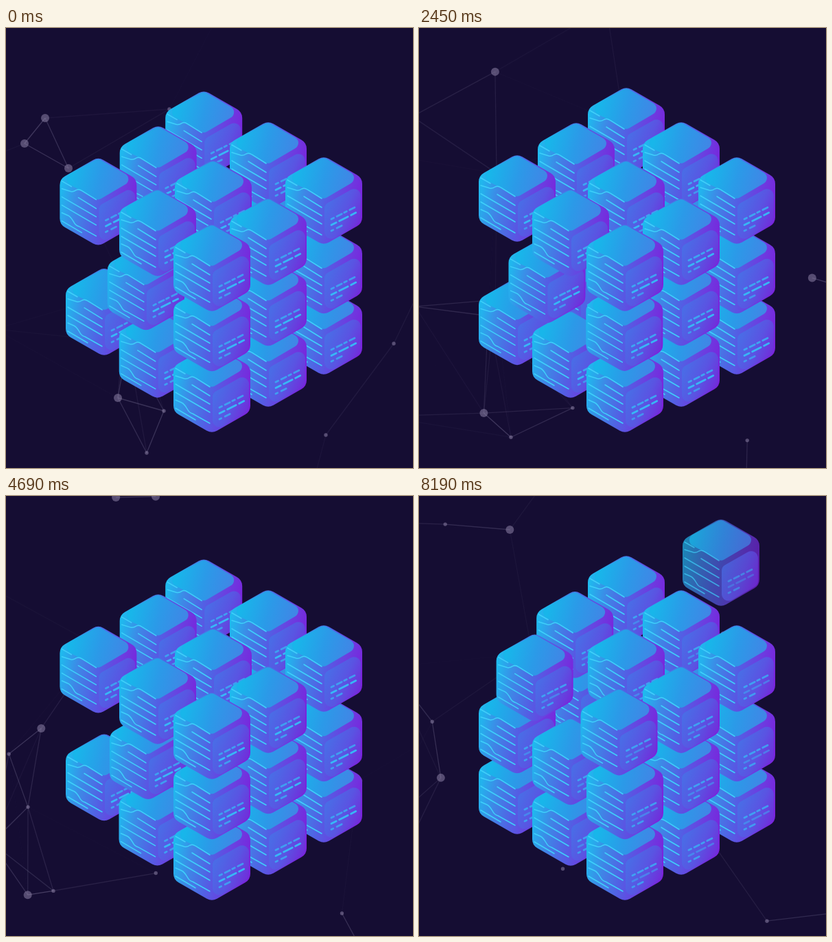
These frames come from a looping animation (593 px wide and 640 px high, 8260 ms). An HTML page with a canvas:

```html
<!DOCTYPE html>
<html lang="en">
<head>
<meta charset="utf-8">
<title>Cube conveyor</title>
<style>
  html, body { margin: 0; width: 100%; height: 100%; overflow: hidden; background: #150d33; }
  canvas { display: block; }
</style>
</head>
<body>
<canvas id="stage" width="593" height="640"></canvas>
<script>
const ctx = document.getElementById('stage').getContext('2d');
const LOOP = 8260, STEP = 70;
const clamp = v => Math.min(1, Math.max(0, v));
const mix = (a, b, p) => a + (b - a) * p;
const ease = p => p < 0.5 ? 4 * p ** 3 : 1 - 4 * (1 - p) ** 3;

// ---------- Drifting network: x, y, then drift in px per second ----------
const REACH = 215;
const hubs = [
  [57, 131, 22, -27.5], [27, 168, -15, -16], [91, 204, 9, 3], [333, -64, -24.5, 13.8],
  [163, 538, -28, 9], [638, 308, -26.6, 22.7], [177, 458, -26.8, -25.6], [-91, 631, 15, -27]
];
const dots = [
  [238, 118, 25, 10], [-142, 236, 22, -23.8], [205, 618, -29, -9.3], [230, 557, -2.5, -1.8],
  [565, 459, 27, -32], [466, 592, 5, 3.2], [419, 770, 23, -20], [-16, 438, 4.3, -13.4],
  [176, 382, -30.7, 15]
];

function drawNetwork(t) {
  const place = r => ([x, y, vx, vy]) => ({ x: x + vx * t / 1000, y: y + vy * t / 1000, r });
  const points = [...hubs.map(place(6)), ...dots.map(place(2.7))];
  ctx.lineWidth = 1.3;
  points.forEach((a, i) => points.slice(i + 1).forEach(b => {
    const near = 1 - Math.hypot(a.x - b.x, a.y - b.y) / REACH;
    if (near <= 0) return;
    ctx.strokeStyle = `rgba(150,142,178,${0.42 * near})`;
    ctx.beginPath();
    ctx.moveTo(a.x, a.y);
    ctx.lineTo(b.x, b.y);
    ctx.stroke();
  }));
  ctx.fillStyle = 'rgba(140,130,165,.55)';
  for (const { x, y, r } of points) {
    ctx.beginPath();
    ctx.arc(x, y, r, 0, 7);
    ctx.fill();
  }
}

// ---------- One cube, drawn with its top corner at the origin ----------
function roundPoly(points, radius) {
  const path = new Path2D(), n = points.length, [lx, ly] = points[n - 1];
  path.moveTo((lx + points[0][0]) / 2, (ly + points[0][1]) / 2);
  points.forEach(([x, y], i) => path.arcTo(x, y, ...points[(i + 1) % n], radius));
  path.closePath();
  return path;
}

function gradient(x0, y0, x1, y1, ...colors) {
  const g = ctx.createLinearGradient(x0, y0, x1, y1);
  colors.forEach((c, i) => g.addColorStop(i / (colors.length - 1), c));
  return g;
}

const body = roundPoly([[0, -3], [56, 29], [56, 95], [0, 127], [-56, 95], [-56, 29]], 15);
const faces = [
  [body, gradient(-56, 50, 56, 74, '#1fb9ee', '#3f86e6', '#5260e4', '#6b3fe0', '#7a22dc')],
  [roundPoly([[1, 68], [54, 38], [54, 94], [1, 125]], 10),
    gradient(2, 75, 54, 98, '#4a6ce6', '#5a54e2', '#7428da')],
  [roundPoly([[0, -1], [53, 29], [0, 60], [-56, 29]], 9),
    gradient(-38, 18, 40, 38, '#18b6ea', '#2b9ae8', '#4086e6')]
];
const circuit = new Path2D(
  'M-53 32L-39 40 M-53 43L-40 47Q-36 48 -32 45Q-28 43 -24 46L-3 59' +
  'M-29 56L-3 72 M-53 55L-3 84 M-53 67L-3 96' +
  'M-53 78L-44 82Q-40 84 -36 91Q-33 97 -28 98L-3 112 M-53 90L-24 107');
const dashRows = [[4, 5, 8, 4], [8, 5, 14, 5], [3, 6, 8, 60]];

function drawCube({ x, y, alpha }, t) {
  ctx.save();
  ctx.translate(x, y);
  ctx.globalAlpha = alpha;
  for (const [path, fill] of faces) {
    ctx.fillStyle = fill;
    ctx.fill(path);
  }
  ctx.lineCap = 'round';
  ctx.lineWidth = 1.5;
  ctx.strokeStyle = '#3fd0fa';
  ctx.stroke(circuit);
  ctx.lineWidth = 2.8;
  ctx.strokeStyle = '#36bdf8';
  dashRows.forEach((dash, i) => {
    ctx.globalAlpha = alpha * (0.7 + 0.25 * Math.sin(t / 374 + i * 1.6));
    ctx.setLineDash(dash);
    ctx.beginPath();
    ctx.moveTo(11, 89 + 8.5 * i);
    ctx.lineTo(47, 71 + 8.5 * i);
    ctx.stroke();
  });
  ctx.restore();
}

// ---------- Conveyor: cubes snake through three layers, two passes per cycle ----------
const CYCLE = 4700, MOVE = 413, OFFSET = 3510, STOREY = 88.5;

// Top ring from the back corner round to the right; the third value is extra drop in lower layers.
const ring = [
  [302, 88, 0], [229, 139, 0], [143, 186, 4], [221, 236, 0], [300, 287, -1], [382, 249, 0], [463, 189, 13]
];
const below = storeys => ring.slice(2).map(([x, y, drop]) => [x, y + drop + STOREY * storeys]);
const tidy = [[440, 35], ...ring, ...below(1).reverse(), ...below(2), [564, 328]];

// After the first pass the three back-left cubes rest slightly past their places.
const overshot = tidy.map(([x, y], i) => {
  if (i < 1 || i > 3) return [x, y];
  const [px, py] = tidy[i - 1];
  return [mix(px, x, 1.1), mix(py, y, 1.1)];
});
const slots = [tidy, overshot];
const LAST = tidy.length - 2;
const layerOf = slot => slot < 8 ? 2 : slot < 13 ? 1 : 0;

// The gap runs backwards through the slots: [slot, departure time] at each change of pace.
const paces = [
  [[0, 2450], [6, 1791], [13, 770], [17, 600]],
  [[0, 4545], [2, 4440], [4, 4404], [11, 3353], [17, 2700]]
];
function departure(pass, slot) {
  const keys = paces[pass], k = keys.findIndex(([s]) => s > slot);
  if (k < 0) return keys[keys.length - 1][1];
  const [s0, t0] = keys[k - 1], [s1, t1] = keys[k];
  return mix(t0, t1, (slot - s0) / (s1 - s0));
}

const still = [];
for (let layer = 0; layer < 3; layer++) {
  const places = [[382, 138], [302, 194]];
  if (layer < 2) places.push([235, 137]);
  for (const [x, y] of places) still.push({ x, y: y + STOREY * (2 - layer), layer, alpha: 1 });
}

function movingCubes(t) {
  const phase = (t + OFFSET) % CYCLE, cubes = [];
  for (let pass = 0; pass < 2; pass++) {
    for (let slot = 0; slot <= LAST; slot++) {
      const start = departure(pass, slot);
      const since = slot === 0 ? start - 290
        : departure(1 - pass, slot - 1) + MOVE - (pass === 0 ? CYCLE : 0);
      for (const now of [phase - CYCLE, phase, phase + CYCLE]) {
        if (now < since || now >= start + MOVE) continue;
        const p = ease(clamp((now - start) / MOVE));
        const [x0, y0] = slots[pass][slot], [x1, y1] = slots[1 - pass][slot + 1];
        cubes.push({
          x: mix(x0, x1, p),
          y: mix(y0, y1, p),
          layer: layerOf(now > start ? slot + 1 : slot),
          alpha: slot === 0 ? clamp((now - since) / 200) : slot === LAST ? 1 - p : 1
        });
      }
    }
  }
  return cubes;
}

function render(t) {
  ctx.fillStyle = '#150d33';
  ctx.fillRect(0, 0, 593, 640);
  drawNetwork(t);
  [...still, ...movingCubes(t)]
    .sort((a, b) => a.layer - b.layer || a.y - b.y)
    .forEach(cube => drawCube(cube, t));
}

const begin = performance.now();
function tick() {
  const t = (performance.now() - begin) % LOOP;
  render(Math.floor(t / STEP) * STEP);
  requestAnimationFrame(tick);
}
tick();
</script>
</body>
</html>
```
